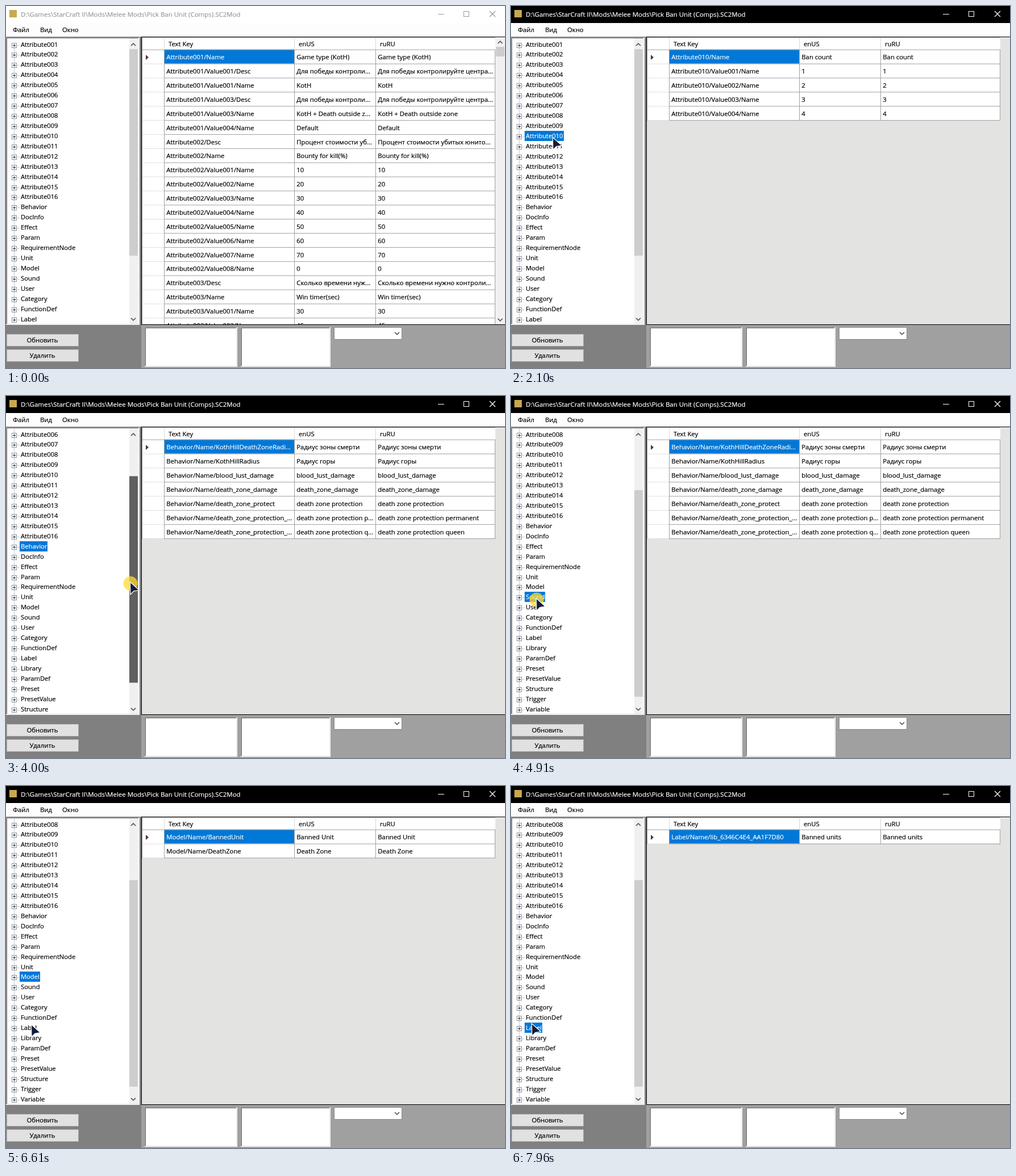
Animation, 878 px wide and 638 px high, one loop 8000 ms. Source, as an HTML page with a canvas:

```html
<!DOCTYPE html>
<html lang="ru">
<head>
<meta charset="utf-8">
<title>Text editor</title>
<style>
html, body { margin: 0; width: 100%; height: 100%; overflow: hidden; background: #808080; }
canvas { display: block; }
</style>
</head>
<body>
<canvas id="stage" width="878" height="638"></canvas>
<script>
const ctx = document.getElementById('stage').getContext('2d');
const LOOP = 8000, ROW = 17.93, GRID_TOP = 76.66, GRID_ROW = 24.88;
const BLUE = '#0078d7', GRAY = '#a0a0a0';
const VISIBLE = 28, THUMB_RANGE = 90;

const items = [
  ...Array.from({ length: 16 }, (_, i) => 'Attribute' + String(i + 1).padStart(3, '0')),
  ...('Behavior DocInfo Effect Param RequirementNode Unit Model Sound User Category ' +
    'FunctionDef Label Library ParamDef Preset PresetValue Structure Trigger Variable').split(' ')
];

// Each row: key | enUS | ruRU (ruRU repeats enUS when left out)
const table = (prefix, text) => text.trim().split('\n').map(line => {
  const [key, en, ru = en] = line.trim().split('|');
  return [prefix + key, en, ru];
});

const tables = {
  start: table('Attribute00', `
    1/Name|Game type (KotH)
    1/Value001/Desc|Для победы контроли...|Для победы контролируйте центра...
    1/Value001/Name|KotH
    1/Value003/Desc|Для победы контроли...|Для победы контролируйте центра...
    1/Value003/Name|KotH + Death outside z...|KotH + Death outside zone
    1/Value004/Name|Default
    2/Desc|Процент стоимости уб...|Процент стоимости убитых юнито...
    2/Name|Bounty for kill(%)
    2/Value001/Name|10
    2/Value002/Name|20
    2/Value003/Name|30
    2/Value004/Name|40
    2/Value005/Name|50
    2/Value006/Name|60
    2/Value007/Name|70
    2/Value008/Name|0
    3/Desc|Сколько времени нуж...|Сколько времени нужно контроли...
    3/Name|Win timer(sec)
    3/Value001/Name|30
    3/Value002/Name|45`),
  Attribute007: table('Attribute007/', `
    Desc|Какие юниты могут ко...|Какие юниты могут контролирова...
    Name|KotH control
    Value001/Name|All
    Value002/Name|Only visible
    Value003/Name|Only ground`),
  Attribute010: table('Attribute010/', `
    Name|Ban count
    Value001/Name|1
    Value002/Name|2
    Value003/Name|3
    Value004/Name|4`),
  Behavior: table('Behavior/Name/', `
    KothHillDeathZoneRadi...|Радиус зоны смерти
    KothHillRadius|Радиус горы
    blood_lust_damage|blood_lust_damage
    death_zone_damage|death_zone_damage
    death_zone_protect|death zone protection
    death_zone_protection_...|death zone protection p...|death zone protection permanent
    death_zone_protection_...|death zone protection q...|death zone protection queen`),
  Sound: table('Sound/Name/', `
    ExplosionBannedUnit|Explosion Banned Unit
    VikingFlyBannedUnit|Viking Fly Banned Unit
    SMFlyByphoenix||SM FlyBy phoenix
    SMJumpBattlecruiserIn||SM Jump Battlecruiser In
    SMJumpBattlecruiserOut||SM Jump Battlecruiser Out`),
  Model: table('Model/Name/', `
    BannedUnit|Banned Unit
    DeathZone|Death Zone`),
  Library: table('Library/Name/', `
    6346C4E4|Pick Ban
    A238E3DA|misc_functions
    BB047126|KotH_MAIN
    F667A78A|BloodLust`),
  Label: table('Label/Name/', `
    lib_6346C4E4_AA1F7D80|Banned units`)
};

// press time, time the table loads, item
const clicks = [
  [745, 1000, 'Attribute007'], [1885, 2055, 'Attribute010'], [2940, 3110, 'Behavior'],
  [4905, 5115, 'Sound'], [5935, 6065, 'Model'], [7145, 7270, 'Library'], [7825, 7950, 'Label']
];
const drag = { from: 3620, to: 4420, y: 264 };

// start, end, destination
const moves = [
  [130, 550, 74, 170], [1220, 1560, 74, 233], [2240, 2640, 106, 300], [2640, 2900, 58, 351],
  [3080, 3380, 219, drag.y], [drag.from, drag.to, 219, drag.y + THUMB_RANGE],
  [4430, 4770, 45, 358], [5270, 5670, 45, 335], [6340, 6820, 45, 442], [7350, 7630, 37, 420]
];

function pointer(t) {
  let x = 703, y = 591;
  for (const [from, to, tx, ty] of moves) {
    if (t < from) break;
    const u = Math.min(1, (t - from) / (to - from)), k = u * (2 - u);
    x += (tx - x) * k;
    y += (ty - y) * k;
  }
  return { x, y };
}

function rect(x, y, w, h, color) {
  ctx.fillStyle = color;
  ctx.fillRect(x, y, w, h);
}
function box(x, y, w, h, fill, edge) {
  rect(x, y, w, h, edge);
  rect(x + 1, y + 1, w - 2, h - 2, fill);
}
// White field with a two-step bevel
function sunken(x, y, w, h) {
  rect(x, y, w, h, '#fff');
  rect(x, y, w - 1, h - 1, GRAY);
  rect(x + 1, y + 1, w - 2, h - 2, '#e3e3e3');
  rect(x + 1, y + 1, w - 3, h - 3, '#696969');
  rect(x + 2, y + 2, w - 4, h - 4, '#fff');
}
function setFont(size) {
  ctx.font = `${size}px "Open Sans", "Noto Sans", sans-serif`;
}
function text(s, x, y, color = '#000', size = 11.3, align = 'left') {
  setFont(size);
  ctx.textAlign = align;
  ctx.fillStyle = ctx.strokeStyle = color;
  ctx.lineWidth = 0.2;
  ctx.fillText(s, x, y);
  ctx.strokeText(s, x, y);
}
function line(points, color, width = 1) {
  ctx.beginPath();
  for (const [x, y] of points) ctx.lineTo(x, y);
  ctx.strokeStyle = color;
  ctx.lineWidth = width;
  ctx.stroke();
}
const chevron = (x, y, dir) =>
  line([[x - 4, y - 2 * dir], [x, y + 2 * dir], [x + 4, y - 2 * dir]], '#444', 1.5);

function titleBar(active) {
  const ink = active ? '#fff' : '#999';
  rect(0, 0, 878, 30, active ? '#000' : '#fff');
  rect(6, 7, 13, 13, '#c8a850');
  text('D:\\Games\\StarCraft II\\Mods\\Melee Mods\\Pick Ban Unit (Comps).SC2Mod', 26, 19, ink, 11.47);
  rect(760, 14, 11, 1, ink);
  ctx.strokeStyle = ink;
  ctx.lineWidth = 1;
  ctx.strokeRect(805.5, 9.5, 9, 9);
  line([[851, 9], [861, 19]], ink, 1.2);
  line([[861, 9], [851, 19]], ink, 1.2);
}

function frame() {
  rect(0, 30, 878, 24, '#fdfdfd');
  text('Файл', 12, 46);
  text('Вид', 60, 46);
  text('Окно', 99, 46);
  rect(0, 54, 238, 584, '#808080');
  rect(238, 54, 640, 508, '#000');
  rect(238, 562, 640, 76, GRAY);
  [['Обновить', 578], ['Удалить', 605]].forEach(([label, y]) => {
    box(1, y, 127, 22, '#e1e1e1', '#adadad');
    text(label, 64, y + 15, '#000', 11.3, 'center');
  });
  sunken(244, 566, 163, 70);
  sunken(413, 566, 158, 70);
  box(577, 566, 120, 22, '#fff', '#8a8a8a');
  chevron(688, 577, 1);
}

function tree(offset, shift, thumbColor, selected) {
  sunken(0, 55, 235, 507);
  for (let y = offset ? 58 : 70; y < 556; y += 2) rect(14, y, 1, 1, '#909090');
  items.slice(offset, offset + VISIBLE).forEach((name, i) => {
    const y = 67.5 + i * ROW, by = Math.round(y - 3);
    for (let x = 20; x < 24; x += 2) rect(x, by + 4, 1, 1, '#909090');
    box(10, by, 9, 9, '#fff', '#919191');
    rect(12, by + 4, 5, 1, '#1c2c60');
    rect(14, by + 2, 1, 5, '#1c2c60');
    if (name === selected) {
      setFont(11.2);
      rect(24, Math.round(y - 9), Math.round(ctx.measureText(name).width + 3), 18, BLUE);
    }
    text(name, 26, Math.round(y + 4), name === selected ? '#fff' : '#000', 11.2);
  });
  rect(217, 57, 15, 503, '#f0f0f0');
  rect(217, 76 + shift, 15, 364, thumbColor);
  chevron(224, 68, -1);
  chevron(224, 552, 1);
}

function grid(rows, scrolls) {
  const cols = [279, 508, 651], height = rows.length * GRID_ROW;
  ctx.save();
  ctx.beginPath();
  ctx.rect(239, 55, 639, 506);
  ctx.clip();
  rect(239, 55, 639, 506, '#e3e3e2');
  rect(239, 55, 622, GRID_TOP + height - 55, '#fff');
  rect(239, 55, 622, 1, GRAY);
  rect(239, 55, 1, GRID_TOP + height - 54, GRAY);
  rect(279, GRID_TOP, 228, GRID_ROW, BLUE);
  ['Text Key', 'enUS', 'ruRU'].forEach((s, i) => {
    rect(cols[i] - 1, 56, 1, 21, '#d8d8d8');
    text(s, cols[i] + 7, 71);
  });
  rows.forEach((row, i) => {
    const y = GRID_TOP + i * GRID_ROW;
    row.forEach((s, c) =>
      text(s, cols[c] + 3.3, Math.round(y + 17.6), i || c ? '#000' : '#fff'));
    rect(240, y + GRID_ROW, 38, 1, '#e0e0e0');
    rect(278, y + GRID_ROW, 583, 1, GRAY);
  });
  rect(240, GRID_TOP, 621, 1, GRAY);
  for (const x of [278, 507, 650, 860]) rect(x, GRID_TOP, 1, height + 1, GRAY);
  ctx.beginPath();
  [[246, 86], [251, 90.5], [246, 95]].forEach(p => ctx.lineTo(...p));
  ctx.fillStyle = '#5c3030';
  ctx.fill();
  rect(861, 55, 17, 506, scrolls ? '#f0f0f0' : '#e3e3e2');
  if (scrolls) {
    rect(862, 72, 15, 17, '#cdcdcd');
    chevron(869.5, 64, -1);
    chevron(869.5, 553, 1);
  }
  ctx.restore();
}

function cursor({ x, y }, pressed) {
  if (pressed) {
    ctx.beginPath();
    ctx.arc(x, y + 1, 12.5, 0, 7);
    ctx.fillStyle = 'rgba(255,220,50,.75)';
    ctx.fill();
  }
  ctx.beginPath();
  [[0, 0], [0.5, 19], [5.5, 14], [14, 12.5]].forEach(([dx, dy]) => ctx.lineTo(x + dx, y + dy));
  ctx.closePath();
  ctx.strokeStyle = '#fff';
  ctx.lineWidth = 2.5;
  ctx.stroke();
  ctx.fillStyle = '#151c38';
  ctx.fill();
}

function draw(t) {
  const p = pointer(t);
  const dragging = t >= drag.from && t < drag.to;
  const shift = t < drag.from ? 0 : t < drag.to ? p.y - drag.y : THUMB_RANGE;
  const offset = Math.round(shift / THUMB_RANGE * (items.length - VISIBLE));
  const thumbColor = dragging ? '#606060' : p.x > 216 && p.x < 233 ? '#a6a6a6' : '#cdcdcd';
  let selected = '', shown = 'start', pressed = dragging;
  for (const [press, load, name] of clicks) {
    if (t >= press) selected = name;
    if (t >= load) shown = name;
    if (t >= press && t < load) pressed = true;
  }
  titleBar(t >= clicks[0][0]);
  frame();
  tree(offset, shift, thumbColor, selected);
  grid(tables[shown], shown === 'start');
  if (t >= moves[0][0]) cursor(p, pressed);
}

function tick() {
  draw(performance.now() % LOOP);
  requestAnimationFrame(tick);
}
tick();
</script>
</body>
</html>
```
